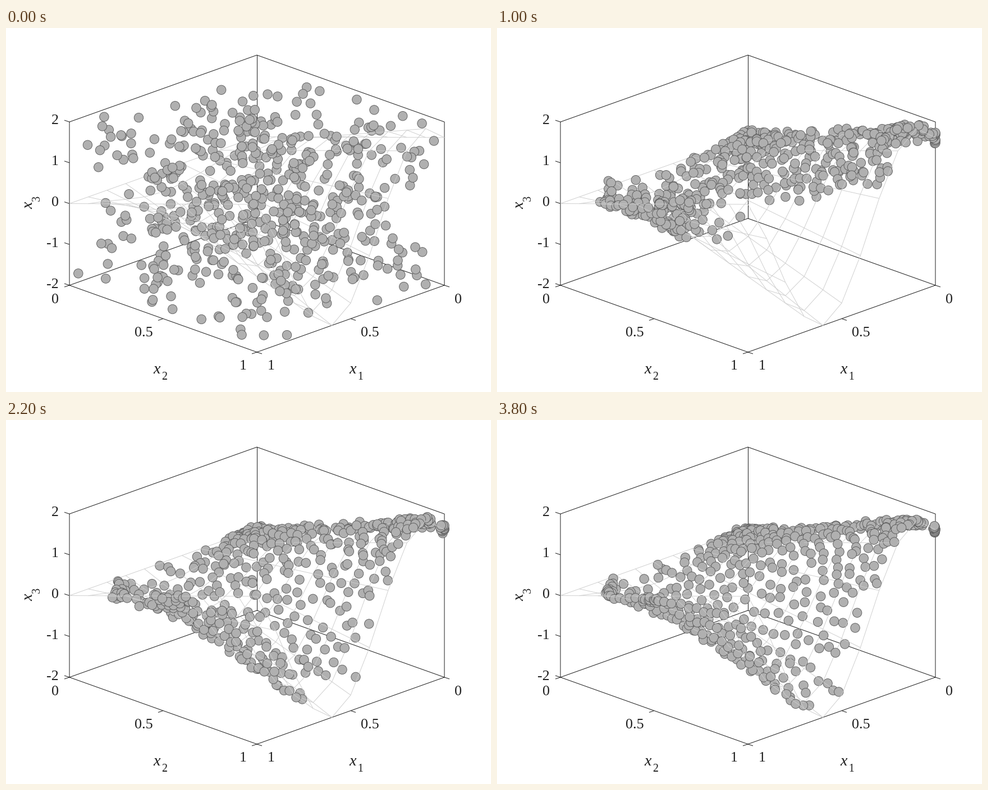
A matplotlib script for the animation above (4000 ms loop, 864x648 px).

```python
import numpy as np
import matplotlib.pyplot as plt
from matplotlib.animation import FuncAnimation
from matplotlib.collections import LineCollection, PathCollection
from matplotlib.path import Path

W, H = 864, 648
FRAMES, INTERVAL = 20, 200
DIVS = 33
RADIUS = 8.2
INK = "#1c1c1c"

rng = np.random.default_rng(8)


def project(x1, x2, x3):
    return 447 + 334 * (x2 - x1), 339 + 119 * (x1 + x2) - 72.7 * (x3 + 2)


def depth(x1, x2, x3):
    return 0.612 * (x1 + x2) + 0.125 * x3


def phase(x1):
    return 2 * np.pi * x1 + 0.3 * np.pi


def surface(x1, x2):
    return 2 * x2 * np.sin(phase(x1))


# Weight vectors on a simplex lattice, each with its ideal point (x1, x2)
weights = np.array([(i, j, DIVS - i - j) for i in range(DIVS + 1)
                    for j in range(DIVS + 1 - i)], float)
N = len(weights)
f1, f2, f3 = 1 / np.maximum(weights, 1e-4).T
goal1 = 2 / np.pi * np.arctan2(f3, np.hypot(f1, f2))
goal2 = 2 / np.pi * np.arctan2(f2, f1)

# Degenerate weights gather in a few clumps
parity = np.arange(N) % 2 == 0
v = rng.random(N)
no1, no2, no3 = (weights == 0).T
goal1[no1] = np.abs(rng.normal(0, 0.06, no1.sum()))
goal2[no1] = np.abs(rng.normal(0, 0.04, no1.sum()))
clump = no2 & ~no1 & parity
goal1[clump] = rng.normal(0.1, 0.02, clump.sum())
goal2[clump] = rng.normal(0.88, 0.03, clump.sum())
near = no3 & parity
goal2[near] = 0.01 + 0.14 * v[near]
goal1[near] = 0.73 + goal2[near]
rim = no3 & ~parity

pull_x1 = rng.random(N) < 0.6
pace = rng.uniform(0.45, 1.1, N)


def reached(level):
    """Points of the surface covered so far; the rest wait at the front."""
    x1, x2 = goal1.copy(), goal2.copy()
    x1[rim] = 1 - 0.05 * min(level, 1)
    x2[rim] = (0.5 + 0.5 * v[rim]) * (1 - level) + (0.38 + 0.14 * v[rim]) * level
    rest = max(0, 1 - level)
    limit = level * (1 - (1 - pace) * rest)
    far = x2 * (1 - np.sin(phase(x1))) / 2
    far *= 1 - 0.35 * np.clip((x1 - 0.5) / 0.25, 0, 1) * rest
    far[(x1 < 0.1) | (x1 > 0.97)] = 0
    late = far > limit
    back = late & pull_x1 & (x1 < 0.6)
    s = np.clip(1 - 2 * limit[back] / x2[back], -1, 1)
    x1[back] = (np.pi - np.arcsin(s)) / (2 * np.pi) - 0.15
    down = late & ~back
    x2[down] *= limit[down] / far[down]
    return x1, x2


def evolve():
    cloud = np.array([rng.random(N), rng.random(N), rng.uniform(-2, 2, N)])
    states = [cloud]
    for k in range(1, FRAMES):
        level = np.interp(k, [1, 3, 5, 7, 11, 15, 19],
                          [0.05, 0.08, 0.24, 0.55, 0.82, 1, 1])
        spread = np.interp(k, [1, 3, 5, 11, 19], [0.25, 0.12, 0.08, 0.05, 0.035])
        wander = np.interp(k, [1, 5, 19], [0.025, 0.015, 0.005])
        chance = np.interp(k, [1, 3, 7, 19], [1, 0.85, 0.6, 0.35])
        x1, x2 = reached(level)
        x1 = np.clip(x1 + rng.normal(0, wander, N), 0, 1)
        x2 = np.clip(x2 + rng.normal(0, wander, N), 0, 1)
        x3 = np.clip(surface(x1, x2) + rng.normal(0, spread, N), -2, 2)
        renewed = rng.random(N) < chance
        cloud = np.where(renewed, [x1, x2, x3], cloud)
        states.append(cloud)
    return states


states = evolve()

fig = plt.figure(figsize=(W / 72, H / 72), dpi=72, facecolor="white")
ax = fig.add_axes([0, 0, 1, 1])
ax.set_xlim(0, W)
ax.set_ylim(H, 0)
ax.axis("off")

# Box and ticks
corners = [
    [(1, 0, 2), (0, 0, 2), (0, 1, 2), (0, 1, -2), (1, 1, -2), (1, 0, -2), (1, 0, 2)],
    [(0, 0, 2), (0, 0, -2)],
    [(1, 0, -2), (0, 0, -2), (0, 1, -2)],
]
lines = [[project(*p) for p in line] for line in corners]


def tick(point, dx, dy):
    x, y = project(*point)
    lines.append([(x, y), (x + dx, y + dy)])


for z in range(-2, 3):
    tick((1, 0, z), -9, -3)
for t in (0, 0.5, 1):
    tick((1, t, -2), -9, 3)
    tick((t, 1, -2), 9, 3)
ax.add_collection(LineCollection(lines, colors=INK, linewidths=1, zorder=1))


def label(x, y, s, size=26, **kw):
    ax.text(x, y, s, family="Liberation Serif", size=size, color=INK,
            va="baseline", rotation_mode="anchor", **{"ha": "center", **kw})


for z in range(-2, 3):
    label(94, 317 - 73 * z, str(z), ha="right")
for x, y, s in [(88, 490, "0"), (245, 549, "0.5"), (422, 608, "1"),
                (472, 608, "1"), (648, 549, "0.5"), (806, 490, "0")]:
    label(x, y, s)
for x, s in [(269, "2"), (618, "1")]:
    label(x, 615, "x", 28, style="italic")
    label(x + 13.5, 626, s, 20)
label(47, 316, "x", 28, style="italic", rotation=90)
label(60, 302.5, "3", 20, rotation=90)

# Mesh segments
grid = np.linspace(0, 1, 11)
segments, seg_depth = [], []


def add_segment(a, b):
    ends = [(x1, x2, surface(x1, x2)) for x1, x2 in (a, b)]
    segments.append(Path([project(*p) for p in ends]))
    seg_depth.append(np.mean([depth(*p) for p in ends]))


for u in grid:
    for a, b in zip(grid[:-1], grid[1:]):
        add_segment((u, a), (u, b))
        add_segment((a, u), (b, u))

# Mesh and markers share one collection, painted back to front
faces = np.array([(0, 0, 0, 0)] * len(segments) + [(0.69, 0.69, 0.69, 1)] * N)
edges = np.array([(0.8, 0.8, 0.8, 1)] * len(segments) + [(0.36, 0.36, 0.36, 1)] * N)
scene = PathCollection([], linewidths=0.9, zorder=2)
ax.add_collection(scene, autolim=False)


def draw(k):
    cloud = states[k]
    dots = [Path.circle(c, RADIUS) for c in zip(*project(*cloud))]
    items = segments + dots
    order = np.argsort(np.concatenate([seg_depth, depth(*cloud)]), kind="stable")
    scene.set_paths([items[i] for i in order])
    scene.set_facecolor(faces[order])
    scene.set_edgecolor(edges[order])
    return (scene,)


anim = FuncAnimation(fig, draw, frames=FRAMES, init_func=lambda: draw(0),
                     interval=INTERVAL, repeat=True, repeat_delay=0)
plt.show()
```
